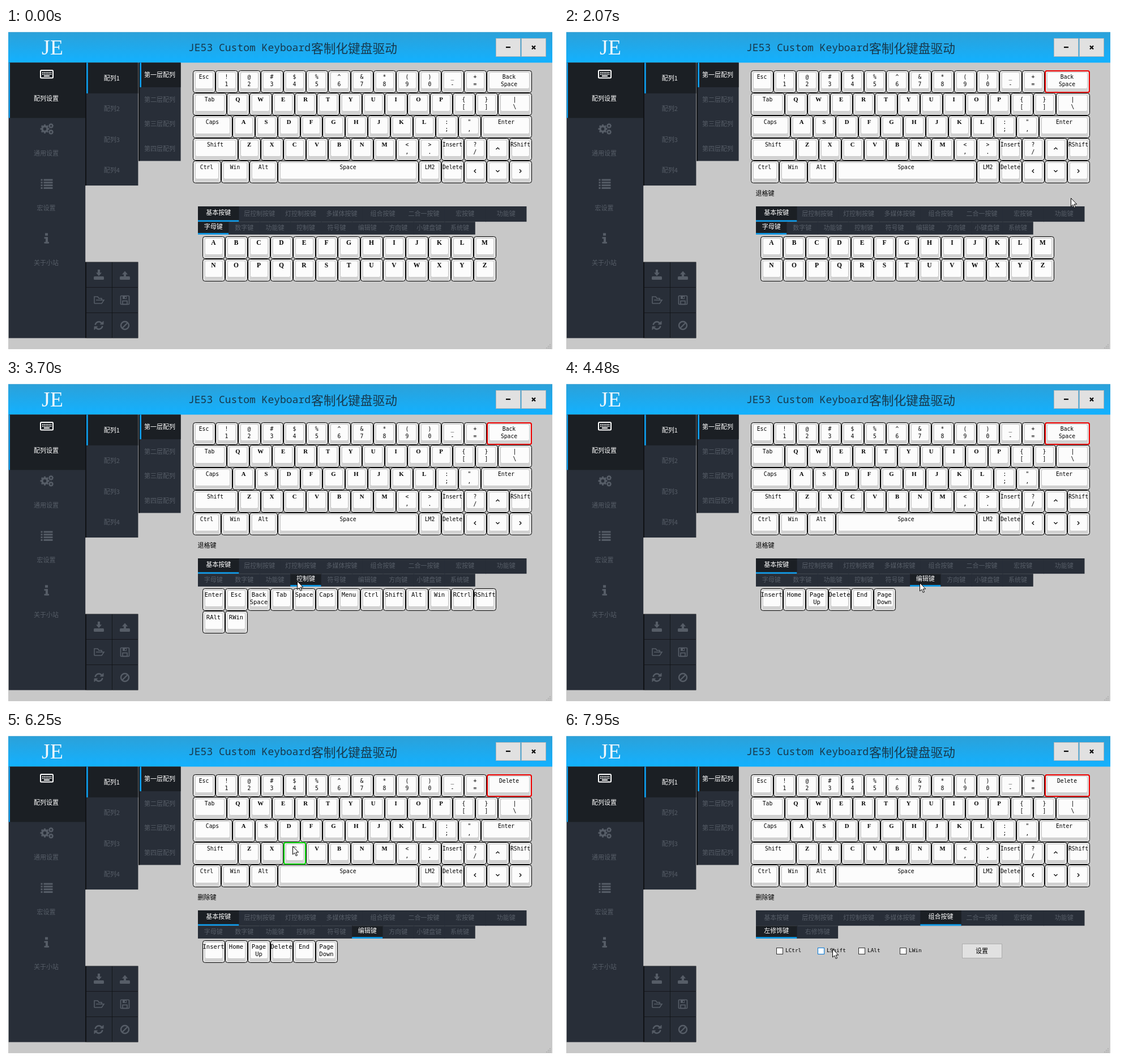
Write an HTML page with a canvas that moves like this. It is 975 px wide and 574 px high and loops after 8000 ms.

```html
<!DOCTYPE html>
<html lang="zh">
<head>
<meta charset="utf-8">
<title>Keyboard driver</title>
<style>
html, body { margin: 0; width: 100%; height: 100%; overflow: hidden; background: #fff; }
canvas { display: block; }
</style>
</head>
<body>
<canvas id="stage" width="975" height="574"></canvas>
<script>
const ctx = document.getElementById('stage').getContext('2d');
const LOOP = 8000, TICK = 77;
const S = 0.907;                       // window scale
const UNIT = 44 * S, TAB = 80 * S, SUBTAB = 60 * S, TOP = 61.4;
const TAB_Y = 316, TAB_H = 30 * S, SUB_Y = TAB_Y + TAB_H, SUB_H = 25 * S;
const BLUE = '#0e9ff0', PANEL = '#282e38', DARK = '#1b1f24', EDGE = '#101215', DIM = '#565d67';
const MONO = '"DejaVu Sans Mono", monospace';
const SERIF = '"Liberation Serif", serif';
const CJK = '"Noto Sans CJK SC", "Noto Sans CJK", sans-serif';
const UI = '11px ' + CJK;

// "·" splits a legend into two lines, "~" gives the key width in units
const BOARD = [
  'Esc !·1 @·2 #·3 $·4 %·5 ^·6 &·7 *·8 (·9 )·0 _·- +·= Back·Space~2',
  'Tab~1.5 Q W E R T Y U I O P {·[ }·] |·\\~1.5',
  'Caps~1.75 A S D F G H J K L :·; "·, Enter~2.25',
  'Shift~2 Z X C V B N M <·, >·. Insert ?·/ △ RShift',
  'Ctrl~1.25 Win~1.25 Alt~1.25 Space~6.25 LM2 Delete ◁ ▽ ▷'
];
const SETS = {
  字母键: ['A B C D E F G H I J K L M', 'N O P Q R S T U V W X Y Z'],
  控制键: ['Enter Esc Back·Space Tab Space Caps Menu Ctrl Shift Alt Win RCtrl RShift', 'RAlt RWin'],
  编辑键: ['Insert Home Page·Up Delete End Page·Down']
};
const TABS = '基本按键 层控制按键 灯控制按键 多媒体按键 组合按键 二合一按键 宏按键 功能键'.split(' ');
const SUBTABS = '字母键 数字键 功能键 控制键 符号键 编辑键 方向键 小键盘键 系统键'.split(' ');
const MODS = ['左修饰键', '右修饰键'];

// pointer stops: arrival time, x, y, and a departure time where it rests
const STOPS = [
  [1080, 845, 426],
  [1770, 885, 95, 1843],
  [2070, 895, 301],
  [2690, 480, 334],
  [2920, 523, 349],
  [3150, 575, 352],
  [3470, 514, 356, 3780],
  [4080, 653, 356, 4400],
  [4940, 480, 380, 5340],
  [5490, 543, 367],
  [5800, 845, 130],
  [6250, 506, 202],
  [6400, 480, 200],
  [6630, 560, 140],
  [7020, 733, 331],
  [7330, 664, 328, 7650],
  [7950, 474, 384]
];

function layout(rows, x0, y0) {
  const keys = [];
  rows.forEach((row, r) => {
    let x = x0;
    for (const item of row.split(' ')) {
      const [label, size = 1] = item.split('~');
      const w = size * UNIT;
      keys.push({ label, x, y: y0 + r * UNIT, w, h: UNIT });
      x += w;
    }
  });
  return keys;
}
const board = layout(BOARD, 330, 75);
const sets = {};
for (const name in SETS) sets[name] = layout(SETS[name], 347, 369);

function rect(x, y, w, h, color) {
  ctx.fillStyle = color;
  ctx.fillRect(x, y, w, h);
}

function frame(x, y, w, h, fill, stroke) {
  rect(x, y, w, h, fill);
  ctx.strokeStyle = stroke;
  ctx.lineWidth = 1;
  ctx.strokeRect(x + 0.5, y + 0.5, w - 1, h - 1);
}

function round(x, y, w, h, r, fill, stroke, lw = 1) {
  ctx.beginPath();
  ctx.roundRect(x, y, w, h, r);
  if (fill) { ctx.fillStyle = fill; ctx.fill(); }
  if (stroke) { ctx.strokeStyle = stroke; ctx.lineWidth = lw; ctx.stroke(); }
}

function text(s, x, y, color, font = UI, align = 'center') {
  ctx.font = font;
  ctx.fillStyle = color;
  ctx.textAlign = align;
  ctx.textBaseline = 'middle';
  ctx.fillText(s, x, y);
}

function line(points, color, lw, fill) {
  ctx.beginPath();
  for (let i = 0; i < points.length; i += 2) ctx.lineTo(points[i], points[i + 1]);
  if (fill) { ctx.closePath(); ctx.fillStyle = fill; ctx.fill(); }
  ctx.strokeStyle = color;
  ctx.lineWidth = lw;
  ctx.stroke();
}

function arc(r, a, b, color, lw) {
  ctx.beginPath();
  ctx.arc(0, 0, r, a, b);
  ctx.strokeStyle = color;
  ctx.lineWidth = lw;
  ctx.stroke();
}

function at(x, y, draw, angle = 0) {
  ctx.save();
  ctx.translate(x, y);
  ctx.rotate(angle);
  draw();
  ctx.restore();
}

const inside = (p, b) => p && p.x >= b.x && p.x < b.x + b.w && p.y >= b.y && p.y < b.y + b.h;

function drawKey(k, size, label = k.label, ring) {
  const x = Math.round(k.x), y = Math.round(k.y);
  const w = Math.round(k.x + k.w) - x, h = Math.round(k.y + k.h) - y;
  round(x + 0.5, y + 0.5, w - 1, h - 1, 4, '#e2e2e2', '#000');
  rect(x + 4, y + h - 8, w - 8, 6, '#d2d2d2');
  round(x + 4.5, y + 3.5, w - 9, h - 11, 3, '#fcfcfc', '#cacaca');
  const mid = x + w / 2 - 0.5;
  const turn = '△▷▽◁'.indexOf(label);
  if (turn >= 0) {
    at(mid, y + 18.5, () => line([-3, 1.5, 0, -1.5, 3, 1.5], '#000', 1.2), turn * Math.PI / 2);
  } else {
    const font = /^[A-Z]$/.test(label) ? `bold ${size + 1}px ${SERIF}` : `${size}px ${MONO}`;
    label.split('·').forEach((s, i) => text(s, mid, y + 12.5 + i * 12.5, '#000', font));
  }
  if (ring) round(x + 1, y + 1, w - 2, h - 2, 3, null, ring, 2);
}

function drawTabs(names, y, w, h, active, p) {
  names.forEach((name, i) => {
    const box = { x: 339 + i * w, y, w, h };
    const on = name === active || inside(p, box);
    rect(box.x, y, w + (i < names.length - 1), h, on ? DARK : PANEL);
    if (on) rect(box.x, y + h - 2.7, w, 2.7, BLUE);
    text(name, box.x + w / 2, y + h / 2 - (on ? 2.5 : 0.5), on ? '#fff' : DIM);
  });
}

function drawColumn(names, x, w, pitch) {
  rect(x, TOP, w, names.length * pitch, PANEL);
  rect(x, TOP, 2, names.length * pitch, EDGE);
  rect(x + 2, TOP, w - 2, pitch, DARK);
  rect(x + 2, TOP, 2.7, pitch, BLUE);
  names.forEach((s, i) => text(s, x + w / 2, TOP + pitch * (i + 0.5), i ? DIM : '#fff'));
}

function gear(r) {
  arc(r * 0.58, 0, 7, DIM, r * 0.45);
  for (let i = 0; i < 8; i++) at(0, 0, () => rect(r * 0.7, -r * 0.18, r * 0.3, r * 0.36, DIM), i * Math.PI / 4);
}

function keyboardIcon() {
  round(-11, -7, 22, 13.5, 1.5, null, '#fff', 2);
  for (let i = 0; i < 6; i++)
    for (let j = 0; j < 2; j++) rect(i * 2.9 - 8, j * 3 - 4, 1.8, 1.8, '#fff');
  rect(-5, 2, 10, 2, '#fff');
}

function gearsIcon() {
  at(-3.5, 0, () => gear(8));
  for (const side of [-1, 1]) at(7.5, side * 5.5, () => gear(4.6));
}

function listIcon() {
  for (let y = -8; y < 8; y += 4.8) {
    rect(-10.5, y, 3, 3, DIM);
    rect(-5.5, y, 16, 3, DIM);
  }
}

function infoIcon() {
  rect(-3, -9, 5, 4.5, DIM);
  rect(-4.5, -2, 6, 2.8, DIM);
  rect(-2, -2, 4, 11, DIM);
  rect(-4.5, 6.5, 8.5, 2.8, DIM);
}

function tray(dir) {
  round(-9, 3, 18, 6, 1.5, DIM);
  line([-6, -2 * dir - 2, 0, 5 * dir - 2, 6, -2 * dir - 2], PANEL, 1, DIM);
  rect(-2, dir > 0 ? -9 : -3, 4, 7, DIM);
}

function folder() {
  line([-8, 6, -8, -6, -2, -6, 0, -3, 5, -3, 5, 0], DIM, 1.6);
  line([-5, 0, 9, 0, 5, 6, -8, 6], DIM, 1.6);
}

function floppy() {
  round(-7.5, -7.5, 15, 15, 1, null, DIM, 1.7);
  ctx.strokeRect(-4, 1.5, 8, 6);
  rect(-4, -7, 7, 5, DIM);
  rect(0, -6, 2, 3, PANEL);
}

function refresh() {
  for (const turn of [0, Math.PI]) {
    at(0, 0, () => {
      arc(6.5, Math.PI * 1.05, Math.PI * 1.8, DIM, 2.5);
      line([8, -7.5, 8, -2, 2.5, -2], DIM, 1, DIM);
    }, turn);
  }
}

function ban() {
  arc(7, 0, 7, DIM, 2.4);
  line([-5, 5, 5, -5], DIM, 2.4);
}

const MENU = [['配列设置', keyboardIcon], ['通用设置', gearsIcon], ['宏设置', listIcon], ['关于小站', infoIcon]];
const TOOLS = [() => tray(1), () => tray(-1), folder, floppy, refresh, ban];

function drawWindow() {
  rect(0, 0, 975, 574, '#fff');
  rect(4, 7.3, 961, 561.7, '#c8c8c8');
  const sky = ctx.createLinearGradient(0, 8, 0, TOP);
  sky.addColorStop(0, '#2ca1d9');
  sky.addColorStop(1, '#12b1ff');
  rect(4, 7.3, 961, TOP - 7.3, sky);
  text('JE', 82, 37, '#eef7fc', '38px ' + SERIF);
  text('JE53 Custom Keyboard', 322, 36, '#17384c', '300 18px "Noto Sans Mono", monospace', 'left');
  text('客制化键盘驱动', 539, 35.5, '#17384c', '300 21.7px ' + CJK, 'left');
  for (const x of [865, 910]) frame(x, 18, 44, 33, '#e1e1e1', '#adb5ba');
  rect(883, 33, 8, 2.2, '#000');
  for (const d of [-3, 3]) line([932 - d, 31.5, 932 + d, 37.5], '#000', 2.2);
  for (let i = 0; i < 3; i++)
    for (let j = 0; j <= i; j++) rect(960 - j * 3, 560 + i * 3, 2, 2, '#b2b2b2');
}

function drawSidebar() {
  rect(4.7, TOP, 135.5, 549.4 - TOP, PANEL);
  rect(4.7, TOP, 135.5, 98, DARK);
  rect(4.7, TOP, 2.3, 98, BLUE);
  MENU.forEach(([name, icon], i) => {
    at(72, 82 + i * 96.8, icon);
    text(name, 71, 124.5 + i * 97.2, i ? DIM : '#fff');
  });
  drawColumn([1, 2, 3, 4].map(n => '配列' + n), 140, 93.4, 60 * S);
  drawColumn([...'一二三四'].map(n => `第${n}层配列`), 234.3, 74.3, 48 * S);

  rect(140, 414.5, 93.4, 134.9, EDGE);
  TOOLS.forEach((icon, i) => {
    const x = 142 + i % 2 * 46, y = 415 + (i >> 1) * 45;
    rect(x, y, 45.2, 44.2, PANEL);
    at(x + 22, y + 22, icon);
  });
}

function drawMods(p) {
  ['LCtrl', 'LShift', 'LAlt', 'LWin'].forEach((s, i) => {
    const x = Math.round(375 + i * TAB);
    const hot = inside(p, { x, y: 380, w: 50, h: 16 });
    frame(x, 382, 12, 12, '#fff', hot ? '#0078d7' : '#333');
    text(s, x + 16, 388, '#000', '9.4px ' + MONO, 'left');
  });
  frame(703, 375, 71, 26, '#e1e1e1', '#adadad');
  text('设置', 738, 388, '#000');
}

function pointer(t) {
  const i = STOPS.findLastIndex(stop => t >= stop[0]);
  if (i < 0) return null;
  const [reach, ax, ay, leave = reach] = STOPS[i];
  const [next, bx, by] = STOPS[i + 1] || [LOOP, ax, ay];
  const n = Math.max(1, Math.round((next - leave) / TICK));
  const f = Math.max(0, Math.floor((t - leave) / (next - leave) * n + 0.1)) / n;
  return { x: Math.round(ax + (bx - ax) * f), y: Math.round(ay + (by - ay) * f) };
}

function drawPointer(p) {
  at(p.x + 0.5, p.y + 0.5, () =>
    line([0, 0, 0, 14.5, 3.3, 11.5, 5.7, 17, 8, 16, 5.6, 10.6, 10.2, 10.6, 0, 0], '#000', 1, '#fff'));
}

function draw(t) {
  const p = pointer(t);
  const picked = t >= 1770, mapped = t >= 5170, combo = t >= 7650;
  const group = t < 3700 ? '字母键' : t < 4310 ? '控制键' : '编辑键';

  drawWindow();
  drawSidebar();
  for (const k of board) {
    const back = k.label === 'Back·Space';
    const ring = back && picked ? '#f00000' : inside(p, k) ? '#00e000' : null;
    drawKey(k, 9.7, back && mapped ? 'Delete' : k.label, ring);
  }
  if (picked) text(mapped ? '删除键' : '退格键', 338.5, 293, '#000', UI, 'left');

  drawTabs(TABS, TAB_Y, TAB, TAB_H, combo ? '组合按键' : '基本按键', p);
  if (combo) {
    drawTabs(MODS, SUB_Y, TAB, SUB_H, MODS[0], p);
    drawMods(p);
  } else {
    drawTabs(SUBTABS, SUB_Y, SUBTAB, SUB_H, group, p);
    for (const k of sets[group]) drawKey(k, 10.5);
  }
  if (p) drawPointer(p);
}

const start = performance.now();
function tick() {
  draw((performance.now() - start) % LOOP);
  requestAnimationFrame(tick);
}
tick();
</script>
</body>
</html>
```
